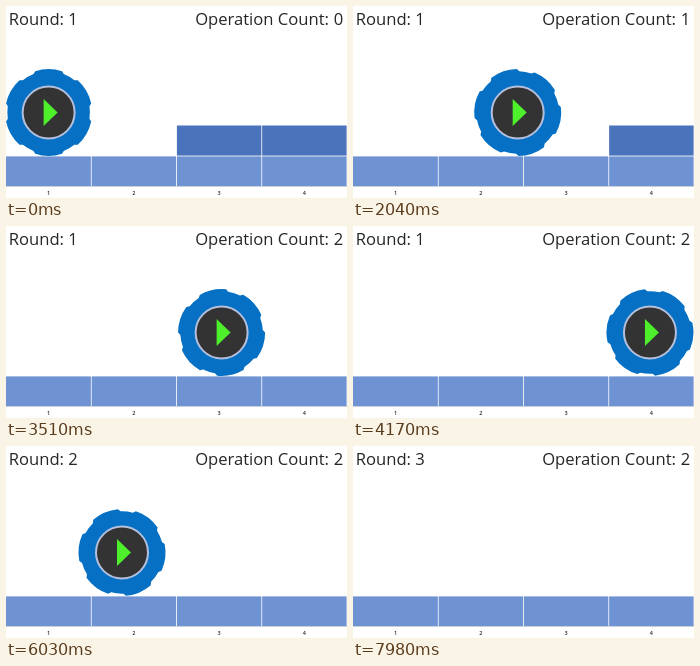
An HTML page that plays this animation: 341x192 px, repeating every 8000 ms.

```html
<!DOCTYPE html>
<html>
<head>
<meta charset="utf-8">
<style>
html, body { margin: 0; width: 100%; height: 100%; overflow: hidden; background: #fff; }
svg { display: block; width: 100vw; height: 100vh; }
text { font-family: "Open Sans", "Noto Sans", sans-serif; font-size: 16.6px; fill: #262626; }
.label { font: 600 5.5px "Open Sans", sans-serif; text-anchor: middle; }
</style>
</head>
<body>
<svg viewBox="0 0 341 192">
  <g id="bars"></g>
  <path d="M0 180.5H341" stroke="#c9cfdb"/>
  <text x="2.8" y="18.6">Round:</text>
  <g id="rounds"></g>
  <text x="189.2" y="18.6">Operation Count:</text>
  <g id="counts"></g>
  <g id="wheel">
    <path id="gear" fill="#0570c4"/>
    <circle r="26" fill="#333" stroke="#b4bfdc" stroke-width="2"/>
    <path d="M-5-13.5L9 0L-5 13.5Z" fill="#4ef02c"/>
  </g>
</svg>
<script>
const LOOP = 8000, CELL = 85.25, STEP = 1680, RADIUS = 43.5;
const $ = id => document.getElementById(id);
const clamp = v => Math.min(1, Math.max(0, v));
const ramp = (t, from, to) => clamp((t - from) / (to - from));
const center = i => (i + 0.5) * CELL;

function add(parent, tag, attrs, text = "") {
  const el = document.createElementNS("http://www.w3.org/2000/svg", tag);
  for (const k in attrs) el.setAttribute(k, attrs[k]);
  el.textContent = text;
  return parent.appendChild(el);
}

// Slow start, quick middle, long settle
function ease(x) {
  let lo = 0, hi = 1, u = 0.5;
  for (let i = 0; i < 20; i++) {
    u = (lo + hi) / 2;
    const v = 1 - u;
    if (1.8 * v * v * u + 0.21 * v * u * u + u ** 3 < x) lo = u; else hi = u;
  }
  return u * u * (3 - 2 * u);
}

// Even speed with a short ramp a at each end
function glide(x, a = 0.08) {
  const top = 1 / (1 - a);
  if (x < a) return top * x * x / (2 * a);
  if (x > 1 - a) return 1 - top * (1 - x) ** 2 / (2 * a);
  return top * (x - a / 2);
}

function gearPath(teeth) {
  const at = (r, a) => `${r * Math.sin(a)} ${-r * Math.cos(a)}`;
  const pitch = 2 * Math.PI / teeth, inner = RADIUS - 2.2;
  let d = "";
  for (let i = 0; i < teeth; i++) {
    const a = i * pitch, b = a + pitch * 0.3;
    d += `${i ? "L" : "M"}${at(RADIUS, a - pitch * 0.3)}A${RADIUS} ${RADIUS} 0 0 1 ${at(RADIUS, b)}`;
    d += `L${at(inner, b + 0.06)}A${inner} ${inner} 0 0 1 ${at(inner, a + pitch * 0.7 - 0.06)}`;
  }
  return d + "Z";
}

const bar = (i, y, h, fill) =>
  add($("bars"), "rect", { x: i * CELL + (i ? 0.4 : 0), y, width: CELL - (i ? 0.8 : 0.4), height: h, fill });
for (let i = 0; i < 4; i++) {
  bar(i, 150.4, 29.6, "#6e92d2");
  add($("bars"), "text", { x: center(i), y: 189, class: "label" }, i + 1);
}
const blocks = [2, 3].map(i => bar(i, 119.5, 30.1, "#4a73bb"));
const digits = (id, x, list) => list.map(n => add($(id), "text", { x, y: 18.6 }, n));
const rounds = digits("rounds", 62.3, [1, 2, 3]);
const counts = digits("counts", 327.8, [0, 1, 2]);
$("gear").setAttribute("d", gearPath(6));

// Cross-fade a row of digits; a and b are the progress of each change
function swap(els, a, b) {
  [1 - a, a * (1 - b), b].forEach((o, i) => els[i].setAttribute("opacity", o));
}

function draw(t) {
  const second = t >= 5200;
  let x = center(0), alpha;
  if (second) {
    x += 3 * CELL * glide(ramp(t, 5645, 6915));
    alpha = ramp(t, 5250, 5560) * (1 - ramp(t, 6990, 7500));
  } else {
    for (let i = 0; i < 3; i++) x += CELL * ease(ramp(t, i * STEP, i * STEP + 1000));
    alpha = 1 - ramp(t, 4440, 4950);
  }
  $("wheel").setAttribute("transform", `translate(${x} 106.5)`);
  $("wheel").setAttribute("opacity", alpha);
  $("gear").setAttribute("transform", `rotate(${(x - center(0)) / RADIUS * 180 / Math.PI})`);

  const hits = [0, 1].map(i => ramp(t, i * STEP + 1050, i * STEP + 1590));
  blocks.forEach((b, i) => b.setAttribute("opacity", 1 - hits[i]));
  swap(counts, ...hits);
  swap(rounds, ramp(t, 4440, 4950), ramp(t, 7480, 7980));
}

function frame() {
  draw(performance.now() % LOOP);
  requestAnimationFrame(frame);
}
frame();
</script>
</body>
</html>
```
